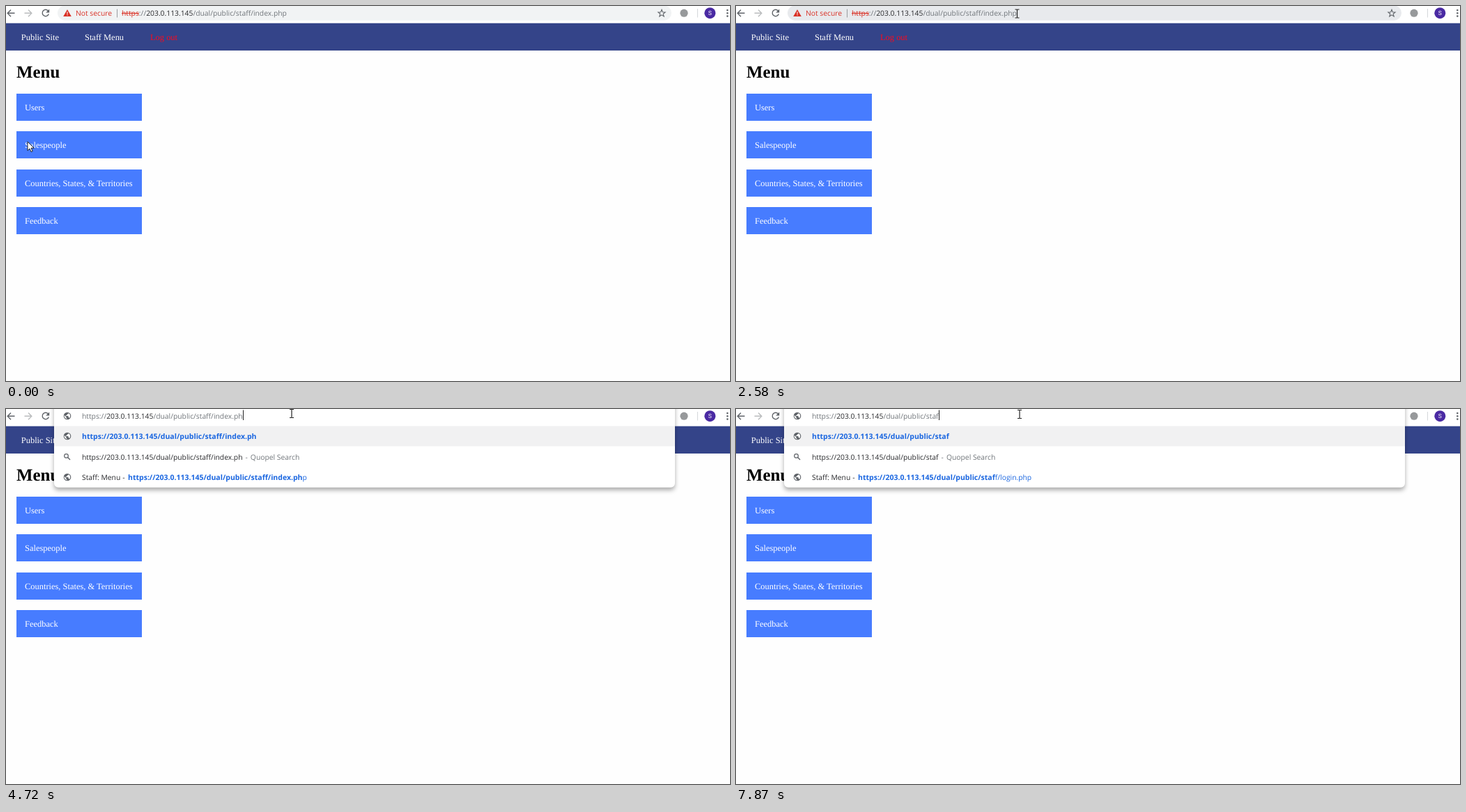
An HTML page that plays this animation: 1039 px wide and 539 px high, repeating every 7.99 s.

```html
<!DOCTYPE html>
<html lang="en">
<head>
<meta charset="utf-8">
<title>Staff: Menu</title>
<style>
  html, body { margin: 0; width: 100%; height: 100%; overflow: hidden; background: #fefefe; }
  svg { display: block; width: 1039px; height: 539px; }
  text { white-space: pre; text-rendering: geometricPrecision; font-variant-ligatures: none; }
  .ui { font: 10.32px "Open Sans", "Noto Sans", sans-serif; fill: #70757a; }
  .page { font: 12.45px "Liberation Serif", serif; fill: #fff; }
  .title { font: bold 24.9px "Liberation Serif", serif; }
  .dark { fill: #27282b; }
  .red { fill: #d93025; }
  .struck { text-decoration: line-through; }
  .link { fill: #1a66e0; }
  .bold { font-weight: 700; font-size: 10.5px; fill: #1a66e0; }
  .selected tspan { fill: #fff; }
  .line { fill: none; stroke: #5f6368; stroke-width: 1.4; }
  #list { filter: drop-shadow(0 4px 3px rgba(0, 0, 0, .32)); }
</style>
</head>
<body>
<svg viewBox="0 0 1039 539">
  <defs>
    <clipPath id="disc"><circle r="5.3"/></clipPath>
    <g id="globe">
      <circle r="5.3" fill="#5f6368"/>
      <path clip-path="url(#disc)" fill="#fff" d="M-4.3 -1.2L-1.6 1.5V2.6L-.5 3.7V4.4Q-3.6 3.8-4.3 1ZM1.6 -3.9Q4.4 -2.6 4.2 .6Q4 2.2 3.1 3L2.2 2.1H1.6V.5L1 0H-2V-1.1H-.8L-.3 -1.6V-2.7H.8Q1.6 -2.8 1.6 -3.9Z"/>
    </g>
  </defs>

  <rect width="1039" height="539" fill="#fefefe"/>
  <rect y="24.5" width="1039" height="39.5" fill="#344489"/>
  <g class="page">
    <text x="21.8" y="49">Public Site</text>
    <text x="113" y="49">Staff Menu</text>
    <text x="207" y="49" fill="#f00" style="fill:#fb0a1e">Log out</text>
  </g>
  <text class="title" x="15" y="103">Menu</text>
  <g id="menu" class="page"></g>

  <rect width="1039" height="24.4" fill="#fff"/>
  <path class="line" d="M12.5 10.3H2.6M7 5.4L2.2 10.3L7 15.2"/>
  <path class="line" style="stroke:#babcbe" d="M26.5 10.3H36.4M32 5.4L36.8 10.3L32 15.2"/>
  <path class="line" d="M60.7 7.2A4.7 4.7 0 1 0 61.3 11.6"/>
  <path fill="#5f6368" d="M62.2 4.6V9.6H57.2Z"/>
  <rect id="pill" y="-.5" height="21.2" rx="10.6"/>
  <path class="red" d="M88 4.9L93.8 15H82.2Z"/>
  <path stroke="#fff" stroke-width="1.1" d="M88 8.3V11.4M88 12.3V13.5"/>
  <text class="ui" x="100" y="14"><tspan class="red">Not secure</tspan></text>
  <path stroke="#9a9da1" d="M159.5 4.5V16.5"/>
  <rect id="mark" x="166" y="3" height="14.5" fill="#0078d7"/>
  <text id="url" class="ui" x="166" y="14"></text>
  <path id="star" class="line" style="stroke-width:1.1"/>

  <circle cx="973" cy="10.2" r="5.6" fill="#97999b"/>
  <path stroke="#d5d7da" d="M992.5 4V16.5"/>
  <circle cx="1010.3" cy="10.2" r="8" fill="#4a2aa3"/>
  <text x="1010.3" y="13.3" text-anchor="middle" fill="#fff" style="font:8.6px Roboto,sans-serif">S</text>
  <g fill="#5f6368"><circle cx="1035.3" cy="6" r="1.3"/><circle cx="1035.3" cy="10.3" r="1.3"/><circle cx="1035.3" cy="14.6" r="1.3"/></g>

  <g id="list">
    <rect x="69" y="-20" width="891" height="132.8" rx="6" fill="#fff"/>
    <rect x="69" y="24.5" width="891" height="29" fill="#f1f1f2"/>
    <use href="#globe" x="88" y="10"/>
    <use href="#globe" x="88" y="39"/>
    <use href="#globe" x="88" y="98"/>
    <circle class="line" style="stroke-width:1.2" cx="86.5" cy="67.4" r="2.8"/>
    <path class="line" d="M88.6 69.5L92 72.9"/>
    <text id="typed" class="ui" x="109" y="14"></text>
    <text id="go" class="ui" x="109" y="43"></text>
    <text id="find" class="ui" x="109" y="72.5"></text>
    <text id="hint" class="ui" x="109" y="102"></text>
  </g>
  <rect id="caret" y="1.5" width="1" height="14.5" fill="#222"/>

  <g id="arrow"><path fill="#fff" stroke="#111" stroke-width=".9" d="M0 0V12.8L3 10L5 14.6L7.1 13.7L5.1 9.2H9.2Z"/></g>
  <g id="hand">
    <path fill="#fff" stroke="#111" stroke-width="1" stroke-linejoin="round" d="M-1.4 1.2Q0 -.6 1.4 1.2V6Q2.8 5 3.9 6.5Q5.2 5.6 6.2 7.1Q7.8 6.5 8.3 8.3V12Q8 14.5 6.7 16V18.3H-1.2V16.5L-5 11.2Q-6 9.2-4.4 8.6Q-3.2 8.4-1.4 11Z"/>
    <path stroke="#111" stroke-width=".8" d="M1.4 6V9M3.9 6.5V9.3M6.2 7.1V9.6"/>
  </g>
  <g id="beam"><path fill="none" stroke="#222" stroke-width="1.2" d="M-3 -6H-.8L0 -5.4L.8 -6H3M0 -5.4V5.4M-3 6H-.8L0 5.4L.8 6H3"/></g>
</svg>
<script>
const LOOP = 7990;
const PROTO = "https://", HOST = "203.0.113.145";
const DIR = "/dual/public/staff";
const PATH = DIR + "/index.php", LOGIN = DIR + "/login.php";
const $ = id => document.getElementById(id);
const span = (cls, text, extra = "") => `<tspan class="${cls}" ${extra}>${text}</tspan>`;
const show = (id, on) => $(id).style.display = on ? "" : "none";

// cut: characters removed from the end of the address; bar: 0 idle, 1 hover, 2 focusing, 3 focused
const steps = [
  [0, { kind: "arrow", x: 31, y: 195, bar: 0, sel: false, caret: false, cut: 0 }],
  [150, { kind: "hand", x: 42, y: 197 }],
  [280, { x: 58, y: 196 }],
  [560, { x: 74, y: 190 }],
  [700, { kind: "arrow", x: 88, y: 174 }],
  [840, { kind: "hand", x: 101, y: 157 }],
  [990, { x: 112, y: 140 }],
  [1130, { x: 117.6, y: 130.6 }],
  [1540, { x: 124, y: 128 }],
  [1680, { kind: "arrow", x: 158, y: 112 }],
  [1820, { x: 205, y: 90 }],
  [1970, { x: 256, y: 67 }],
  [2120, { x: 306, y: 46 }],
  [2270, { x: 350, y: 28 }],
  [2430, { kind: "beam", x: 386, y: 15, bar: 1 }],
  [2580, { x: 403.5, y: 11 }],
  [3010, { bar: 2, sel: true }],
  [3140, { bar: 3 }],
  [3440, { x: 408, y: 8 }],
  [3590, { x: 410, y: 6.5, sel: false, caret: true }],
  [4150, { caret: false }],
  [4720, { cut: 1, caret: true }],
  [5140, { cut: 2 }],
  [5280, { cut: 3 }],
  [5420, { cut: 4 }],
  [5690, { cut: 6 }],
  [5980, { cut: 7 }],
  [6120, { cut: 8 }],
  [6560, { cut: 9 }],
  [7000, { cut: 10 }],
  [7150, { x: 408.5, y: 6.5 }],
  [7300, { x: 407, y: 7.5 }],
  [7570, { caret: false }],
  [7870, { cut: 11, caret: true }]
];
const states = [];
for (const [, change] of steps) states.push({ ...states[states.length - 1], ...change });

const pills = [
  { fill: "#f1f3f4", stroke: "none", x: 74, width: 881 },
  { fill: "#e8eaed", stroke: "none", x: 74, width: 881 },
  { fill: "#fff", stroke: "#c4dafa", x: 74, width: 881 },
  { fill: "#fff", stroke: "#a3c4f3", x: 74, width: 881 }
];

const labels = ["Users", "Salespeople", "Countries, States, &amp; Territories", "Feedback"];
$("menu").innerHTML = labels.map((label, i) => {
  const y = 126 + i * 54.4;
  return `<rect x="15" y="${Math.round(y)}" width="180" height="39"/><text x="27" y="${y + 24}">${label}</text>`;
}).join("");
const buttons = $("menu").querySelectorAll("rect");

$("star").setAttribute("d", "M" + Array.from({ length: 10 }, (_, i) => {
  const r = i % 2 ? 2.3 : 5.4, a = i * Math.PI / 5;
  return `${941 + r * Math.sin(a)} ${10.6 - r * Math.cos(a)}`;
}).join("L") + "Z");

$("url").innerHTML = span("red struck", "https") + "://" + span("dark", HOST) + span("", PATH);

function drawList(cut) {
  const path = PATH.slice(0, PATH.length - cut);
  const address = PROTO + HOST + path;
  const rest = (cut < 10 ? PATH : LOGIN).slice(path.length);
  $("typed").innerHTML = PROTO + span("dark", HOST) + path;
  $("go").innerHTML = span("bold", address);
  $("find").innerHTML = span("dark", address) + span("", "-", 'dx="4"') + span("", "Quopel Search", 'dx="4"');
  $("hint").innerHTML = span("dark", "Staff: Menu") + span("dark", "-", 'x="167.2"') +
    span("bold", address, 'x="175"') + span("link", rest);
}

function draw(s) {
  const open = s.cut > 0;
  const hover = s.kind === "hand" ? Math.round((s.y - 145) / 54.4) : -1;
  buttons.forEach((b, i) => b.setAttribute("fill", i === hover ? "#3f70e1" : "#477cff"));
  for (const [name, value] of Object.entries(pills[s.bar])) $("pill").setAttribute(name, value);
  $("pill").setAttribute("stroke-width", 1.6);

  $("url").classList.toggle("selected", s.sel);
  $("url").style.fill = s.sel ? "#fff" : "";
  $("mark").setAttribute("width", $("url").getComputedTextLength());
  show("mark", s.sel);

  show("list", open);
  if (open) drawList(s.cut);
  const field = $(open ? "typed" : "url");
  const end = (open ? 109 : 166) + field.getComputedTextLength();
  $("caret").setAttribute("x", Math.round(end));
  show("caret", s.caret);

  for (const kind of ["arrow", "hand", "beam"]) show(kind, kind === s.kind);
  $(s.kind).setAttribute("transform", `translate(${s.x} ${s.y})`);
}

let last = -1;
const start = performance.now();
function tick() {
  const t = (performance.now() - start) % LOOP;
  let i = steps.length - 1;
  while (steps[i][0] > t) i--;
  if (i !== last) draw(states[last = i]);
  requestAnimationFrame(tick);
}
tick();
</script>
</body>
</html>
```
